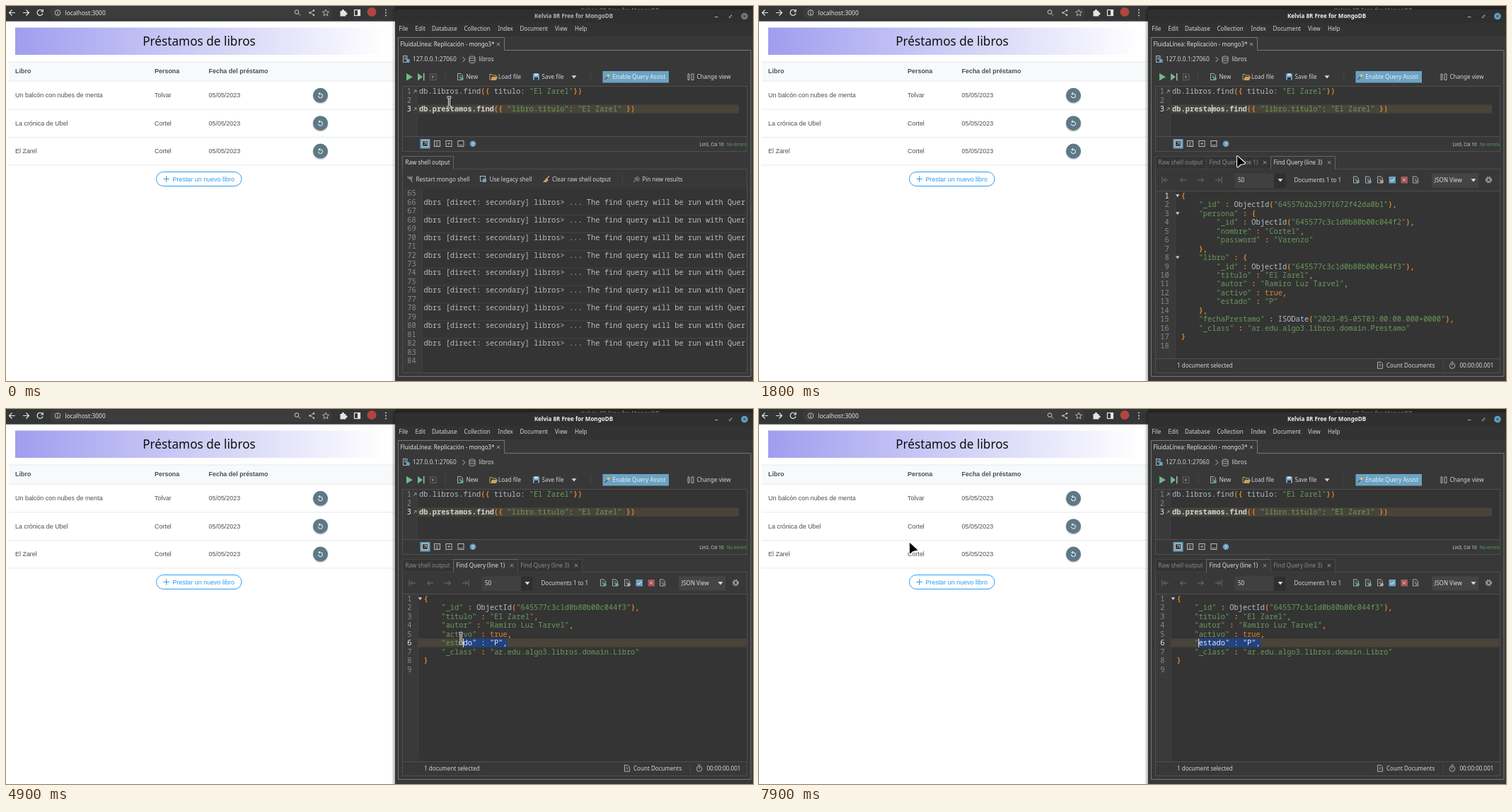
Recreate the animation shown at these times as an HTML page. Size 1056 by 530 pixels, loop 8 s.

```html
<!DOCTYPE html>
<html lang="es">
<head>
<meta charset="utf-8">
<title>Préstamos de libros</title>
<style>
  html, body { margin: 0; width: 100%; height: 100%; overflow: hidden; background: #fff; }
  svg { display: block; width: 1056px; height: 530px; }
  text { white-space: pre; }
  .ui { font: 8.05px "Noto Sans", "Open Sans", sans-serif; }
  .web { font: 8.95px "Liberation Sans", Arial, sans-serif; }
  .mono { font: 10.38px "Noto Sans Mono", "DejaVu Sans Mono", monospace; }
  .b { font-weight: bold; }
</style>
</head>
<body>
<svg id="stage" viewBox="0 0 1056 530"></svg>
<script>
const CW = 6.228, LH = 12.45, LOOP = 8000;
const C = { text: '#d4d4d4', dim: '#8a8a8a', code: '#b4bcc4', str: '#6a9a5b', punct: '#d9822f',
  panel: '#383838', edit: '#343434', gutter: '#3a3a3a', field: '#404040', line: '#555', active: '#48443a', blue: '#6ba2c2' };

const BOOK = 'El Zarel', READER = 'Cortel', APP = 'Kelvia 8R Free for MongoDB';

// Drawing helpers
const rect = (x, y, w, h, fill, more = '') =>
  `<rect x="${x}" y="${y}" width="${w}" height="${h}" fill="${fill}" ${more}/>`;
const path = (d, stroke, width = 1, fill = 'none', more = '') =>
  `<path d="${d}" stroke="${stroke}" stroke-width="${width}" fill="${fill}" ${more}/>`;
const solid = (d, fill, more = '') => path(d, 'none', 0, fill, more);
const circle = (x, y, r, fill, more = '') => `<circle cx="${x}" cy="${y}" r="${r}" fill="${fill}" ${more}/>`;
const text = (cls, x, y, s, fill, more = '') => `<text class="${cls}" x="${x}" y="${y}" fill="${fill}" ${more}>${s}</text>`;
const ui = (x, mid, s, fill = C.text, more = '') => text('ui', x, mid + 2.9, s, fill, more);
const mono = (x, mid, s, fill = C.code, more = '') => text('mono', x, mid + 3.6, s, fill, more);
const group = (id, body, more = '') => `<g id="${id}" ${more}>${body}</g>`;
const cross = (x, y, r = 2.2, color = '#aaa') =>
  path(`M${x - r} ${y - r}l${2 * r} ${2 * r}m0 ${-2 * r}l${-2 * r} ${2 * r}`, color, .9);
const down = (x, y, color = C.text) => solid(`M${x - 3.5} ${y - 2}h7l-3.5 4.2z`, color);
const page = (x, y, accent) => path(`M${x - 3.5} ${y - 4.5}h4.5l2.5 2.5v6.5h-7z`, '#bbb', .9) +
  path(`M${x - 1.5} ${y - 1}h3m-3 2h3`, '#bbb', .7) + (accent ? circle(x + 2.6, y + 2.8, 2.3, accent) : '');
const numberStyle = active => ({ fill: active ? '#eee' : C.dim, 'font-weight': active ? 'bold' : 'normal' });
const attrs = o => Object.entries(o).map(([k, v]) => `${k}="${v}"`).join(' ');
const lineNumber = (x, mid, n, active, id = '') =>
  mono(x, mid, n, C.dim, `id="${id}" text-anchor="end"`).replace(`fill="${C.dim}"`, attrs(numberStyle(active)));

const highlight = s => s.replace(/("[^"]*")|( :|[{}(),])|\b(true)\b/g, (m, str, punct) =>
  str ? `<tspan fill="${C.str}">${m}</tspan>`
    : `<tspan fill="${C.punct}"${punct ? ' font-weight="bold"' : ''}>${m}</tspan>`);

function browser() {
  const icon = '#d0d0d0';
  let s = rect(0, 0, 550, 530, '#fff') + rect(0, 0, 550, 21.5, '#343536') +
    rect(62, 1, 399, 17, '#3c3c3d', 'rx="8.5"') + rect(0, 20.5, 550, 1, '#444');
  s += path('M13 9.5H4.5m4-4l-4 4 4 4', '#e6e6e6', 1.2) + path('M24 9.5h8.5m-4-4l4 4-4 4', '#e6e6e6', 1.2) +
    path('M51.5 7A4 4 0 1 0 52 10.5M52.3 4.8V8h-3.2', '#e6e6e6', 1.2);
  s += circle(73, 9.5, 3.8, 'none', `stroke="${icon}" stroke-width=".9"`) + path('M73 8.8v3M73 6.8v1', icon);
  s += text('ui', 83.5, 12.5, 'localhost:3000', '#e4e4e4', 'style="font-size:8.45px"');
  s += circle(411, 8.5, 2.8, 'none', `stroke="${icon}"`) + path('M413 10.5l3 3', icon);
  s += path('M435 6.3l-5 3.2 5 3.2', icon, .8) +
    [[435, 6.3], [429.5, 9.5], [435, 12.7]].map(p => circle(...p, 1.2, icon)).join('');
  s += path('M452 5l1.3 3 3.2.3-2.4 2.1.7 3.2-2.8-1.7-2.8 1.7.7-3.2-2.4-2.1 3.2-.3z', icon, .8);
  s += solid('M472.5 7h2.3a1.7 1.7 0 1 1 3.2 0h2.3v2.2a1.7 1.7 0 1 1 0 3.2v2h-7.8z', '#e4e4e4');
  s += rect(492.5, 5.5, 8, 8, 'none', 'stroke="#e4e4e4" stroke-width="1.2"') + rect(497, 5, 4, 9, '#e4e4e4');
  s += circle(517, 8.5, 6.5, '#b0453f');
  s += [5.5, 9.5, 13.5].map(y => circle(537, y, 1, icon)).join('');

  s += rect(13, 30.5, 524, 38.5, 'url(#banner)');
  s += text('ui', 273, 56.3, 'Préstamos de libros', '#111', 'text-anchor="middle" style="font-size:17.2px"');
  s += rect(4, 79, 546, 27, '#f8f9fa');
  s += [79, 106, 146, 185.5, 225].map(y => rect(4, y - .5, 546, 1, '#e6e9ec')).join('');
  const row = (y, cells, cls) => cells.map((c, i) => text(cls, [13, 210, 286.5][i], y, c, '#495057')).join('');
  s += row(95.2, ['Libro', 'Persona', 'Fecha del préstamo'], 'web b');
  [['Un balcón con nubes de menta', 'Tolvar'], ['La crónica de Ubel', READER], [BOOK, READER]].forEach((r, i) => {
    const y = 126.3 + 39.4 * i;
    s += row(y + 3, [...r, '05/05/2023'], 'web') + circle(444.5, y + 1, 11, '#000', 'opacity=".18"') +
      circle(444.5, y, 10.5, '#5d7886') +
      path(`M442 ${y - 2.4}h2.5a3 3 0 1 1 -3 3M443.8 ${y - 4.2}l-1.8 1.8 1.8 1.8`, '#fff', 1);
  });
  s += rect(212.5, 234.5, 120.5, 20, '#fff', 'rx="10" stroke="#2f9bf0"') + path('M222.5 244.5h8.5m-4.25-4.25v8.5', '#2f9bf0', 1.1);
  return s + text('web', 235.5, 247.7, 'Prestar un nuevo libro', '#2f9bf0');
}

function appWindow() {
  let s = rect(550, 0, 506, 530, '#232323');
  s += `<g clip-path="url(#strip)">${text('ui b', 868, 8.5, APP, '#666', 'text-anchor="middle"')}</g>`;
  s += solid('M550 530V10q0-5 5-5h501v525z', C.panel) + solid('M550 24V10q0-5 5-5h501v19z', '#2f2f2f') + rect(550, 24, 506, 19, '#323232');
  s += text('ui b', 802.5, 17.4, APP, '#b4b4b4', 'id="title" text-anchor="middle"');
  s += path('M1002 15.5h4.5', '#aaa', 1.1) + path('M1022.5 16.5l3.5-3.5m-2 0h2v2m-3.5-.5v2h2', '#999', .9) +
    circle(1044, 14.5, 4.8, '#777', 'id="close"') + cross(1044, 14.5, 1.6, '#292929');
  [['File', 555.5], ['Edit', 578.5], ['Database', 602], ['Collection', 647.5], ['Index', 695.5], ['Document', 726.5],
    ['View', 776], ['Help', 804]].forEach(([n, x]) => s += ui(x, 32.2, n));
  s += path('M554.5 62.5V44.5H704.5V62.5H1053V523.5H554.5V62.5', '#777');
  s += ui(557.5, 53.8, 'FluidaLínea: Replicación - mongo3*', '#e2e2e2') + cross(696, 54);

  s += rect(561.5, 70.5, 5.5, 9, 'none', 'stroke="#9bb8c8"') + path('M563 73h3m-3 2h3', '#9bb8c8') + rect(566, 75, 4.5, 5, C.blue);
  s += ui(575, 75.4, '127.0.0.1:27060', C.text, 'style="font-size:8.4px"') + path('M645.5 72l3.5 3.5-3.5 3.5', '#bbb') +
    path('M655 72.5v6.5c0 2 8 2 8 0v-6.5c0-2-8-2-8 0c0 2 8 2 8 0M655 75.7c0 2 8 2 8 0', '#bbb', .9) + ui(668.5, 75.4, 'libros');

  s += group('run', solid('M566 95l9 5.2-9 5.2z', '#6fb98a') +
    solid('M582 95l7 5.2-7 5.2z', '#6fb98a') + rect(590, 95, 1.4, 10.4, '#bbb'));
  s += rect(599.5, 96, 8.5, 8.5, 'none', 'stroke="#777" stroke-dasharray="2 1"') + solid('M602 97.8l4 2.5-4 2.5z', '#777');
  s += [620.5, 826.5].map(x => rect(x, 93, .8, 14, '#4a4a4a')).join('');
  s += page(642, 100, '#62a77d') + ui(650.5, 100.2, 'New');
  s += path('M684 104.5v-8h3l1 1.5h5v2', '#c9a25e') + solid('M685 105l2-5h8l-2 5z', '#c9a25e') + ui(696, 100.2, 'Load file');
  s += rect(745, 95.5, 9, 9, C.blue) + rect(747, 95.5, 5, 3, '#ddd') + rect(747, 101, 5, 3.5, '#333') +
    ui(757.5, 100.2, 'Save file') + down(803, 100.2);
  s += rect(843.5, 92, 93.5, 16.5, C.blue) +
    path('M846.5 104l4-4', '#555', 1.5) + circle(851.5, 98.5, 2, '#e0c070') + ui(857.5, 100.2, 'Enable Query Assist', '#e8f1f6');
  s += path('M964 96v8.5h2V96zM969 96v8.5h3V96z', '#bbb', .9) + ui(976.5, 100.2, 'Change view');

  s += rect(560.5, 113.5, 487, 92, C.edit, `stroke="${C.line}" stroke-width=".8"`) + rect(561, 114, 20.5, 70.5, C.gutter) +
    rect(582, 139.5, 454, 12.3, C.active) + rect(561, 184.5, 486, 20.5, C.panel) + rect(561, 184, 486, .8, C.line) + rect(581.5, 114, .6, 70, '#484848');
  [`db.libros.find({ titulo: "${BOOK}"})`, '', `db.prestamos.find({ "libro.titulo": "${BOOK}" })`].forEach((l, i) => {
    const y = 120.8 + LH * i;
    s += lineNumber(573, y, i + 1, i == 2);
    if (l) s += path(`M576 ${y + 2.2}l4-4m-2.7 0h2.7v2.7`, '#aaa', .9) +
      mono(584, y, highlight(l).replace('db.prestamos.find', '<tspan font-weight="bold" fill="#ccd2d8">$&</tspan>'));
  });
  s += rect(640, 139.5, 1, 12, '#ddd', 'id="caret"');
  s += rect(585.5, 188, 14, 13.5, C.blue);
  s += [592.5, 609.5, 626, 643].map((x, i) => rect(x - 4, 190.5, 8, 8, '#333', 'stroke="#ccc" stroke-width=".9"') +
    path([`M${x - 2} 196.5l4-4m-4 0h4v4`, `M${x - 2} 193h4m-4 2h3m-3 2h4`, `M${x - 2} 194.5h4m-2-2v4`, `M${x - 2.5} 196.5h5`][i], '#bbb', .8)).join('');
  s += circle(660, 194.8, 4.3, C.blue) + ui(660, 194.8, '?', '#fff', 'text-anchor="middle" style="font-size:7px"');
  s += ui(980.5, 194.7, 'Lin3, Col 10', C.text, 'style="font-size:6.3px"') + ui(1019, 194.7, 'No errors', '#58a65c', 'style="font-size:6.2px"');
  return s;
}

const frame = () => path('M560.5 230.5H1047.5V518.5H560.5Z', C.line, .8);
function tab(x, w, label, active, closable = true) {
  const edge = active ? '#707070' : '#4c4c4c';
  return path(`M${x} 230.5V212.5h${w}v18`, edge, .8, active ? C.panel : '#343434') +
    (active ? rect(x + .5, 230, w - 1, 1, C.panel) : '') +
    ui(x + 4, 221.2, label, active ? '#e0e0e0' : '#8c8c8c') + (closable ? cross(x + w - 8.5, 221.2) : '');
}

function rawPanel() {
  let s = frame() + tab(560.5, 72, 'Raw shell output', true, false);
  s += path('M567 242h8m-6 2h5l-2 2 3 2.5', '#bbb') + ui(579.5, 244.6, 'Restart mongo shell');
  s += rect(670.5, 240.5, 7, 7, 'none', 'stroke="#bbb"') + rect(674, 244, 5, 5, C.blue) + ui(683.5, 244.6, 'Use legacy shell');
  s += path('M768 240l-4 5', '#ccc', 1.2) + solid('M764 243l3 3-3 3h-5z', '#c9a25e') + ui(772, 244.6, 'Clear raw shell output');
  s += rect(871, 238, .8, 13, '#4a4a4a') + path('M887 249l3.5-3.5m-2-2.5l5 5m-3.5-6l5 5m-3-6l4 4', '#bbb', .9) + ui(899.5, 244.6, 'Pin new results');
  s += rect(561, 258, 486, 260, C.edit) + rect(561, 258, 27, 260, C.gutter) + rect(588, 258, .6, 260, '#484848');
  for (let i = 0; i < 20; i++) {
    const y = 264.8 + LH * i;
    s += lineNumber(579.7, y, 65 + i, false);
    if (i % 2 && i < 18) s += mono(590.5, y, 'dbrs [direct: secondary] libros> ... The find query will be run with Quer') +
      (i > 1 ? rect(590, y - 7, 456, .8, '#484848') : '');
  }
  return s;
}

const bookDoc = `{
    "_id" : ObjectId("645577c3c1d0b80b00c044f3"),
    "titulo" : "${BOOK}",
    "autor" : "Ramiro Luz Tarvel",
    "activo" : true,
    "estado" : "P",
    "_class" : "ar.edu.algo3.libros.domain.Libro"
}
`;
const loanDoc = `{
    "_id" : ObjectId("64557b2b23971672f42da0b1"),
    "persona" : {
        "_id" : ObjectId("645577c3c1d0b80b00c044f2"),
        "nombre" : "${READER}",
        "password" : "Varenzo"
    },
    "libro" : {
        "_id" : ObjectId("645577c3c1d0b80b00c044f3"),
        "titulo" : "${BOOK}",
        "autor" : "Ramiro Luz Tarvel",
        "activo" : true,
        "estado" : "P"
    },
    "fechaPrestamo" : ISODate("2023-05-05T03:00:00.000+0000"),
    "_class" : "ar.edu.algo3.libros.domain.Prestamo"
}
`;

function resultPanel(id, tabs, doc, loading) {
  const tone = loading ? '#b0b0b0' : '#dedede';
  let s = frame() + tabs;
  s += path('M570 241.5v9m9-4.5h-7m3-3l-3 3 3 3M604 246h-8.5m3.5-3l-3.5 3 3.5 3M620 246h8.5m-3.5-3l3.5 3-3.5 3M645 246h7m-3-3l3 3-3 3m5-7.5v9', '#777', .9);
  s += rect(672.5, 236.5, 72, 20.5, C.field) + rect(728, 236.5, 16.5, 20.5, '#2f2f2f') +
    ui(677, 246.4, '50', tone) + down(737, 246.2, tone) + ui(756.5, 246.2, 'Documents 1 to 1');
  s += page(844, 245.5, '#62a77d') + page(861, 245.5, C.blue) + page(878, 245.5, '#aaa') +
    rect(890.5, 241, 9.5, 9.5, C.blue) + path('M892.5 246l2 2 3.5-4', '#fff') +
    rect(907.5, 241, 9.5, 9.5, '#a85555') + cross(912, 245.7, 2, '#ddd') + page(928, 245.5, '#777');
  s += rect(951, 236.5, 66, 20, '#444') + ui(955, 246.2, 'JSON View', tone) + down(1010, 246.2, tone);
  s += circle(1031.5, 245.7, 3.7, 'none', 'stroke="#bbb" stroke-width="1.8" stroke-dasharray="1.7 1.2"') + circle(1031.5, 245.7, 2.2, 'none', 'stroke="#bbb"');

  const lines = doc.split('\n'), wide = lines.length > 9 ? CW : 0, x = 590.5 + wide;
  s += rect(561, 261.5, 486, 236.5, C.edit) + rect(561, 261.5, 21 + wide, 236.5, C.gutter) + rect(582 + wide, 261.5, .6, 236.5, '#484848') +
    rect(561, 261, 486, .8, C.line) + rect(561, 498, 486, .8, C.line);
  s += rect(582.5, 324.4, 464, 12.3, C.active, `id="${id}Line" visibility="hidden"`);
  lines.forEach((l, i) => {
    const y = 268.3 + LH * i;
    s += lineNumber(573.5 + wide, y, i + 1, !i, `${id}N${i + 1}`) + mono(x, y, highlight(l));
    if (l.endsWith('{')) s += solid(`M${x - 7.7} ${y - 2}h5.4l-2.7 4z`, '#ccc');
  });
  s += ui(591, 507.8, '1 document selected') + page(878, 507.8) + ui(887, 507.8, 'Count Documents') + rect(967, 501, .8, 14, '#4a4a4a') +
    circle(980, 508.5, 3.8, 'none', 'stroke="#bbb" stroke-width=".9"') + path('M978.5 503h3m-1.5 3v2.5', '#bbb') + ui(990.5, 507.8, '00:00:00.001');
  return s;
}

const rawTab = tab(560.5, 72, 'Raw shell output', false, false);
const findTabs = active => rawTab + tab(632.5, 91, 'Find Query (line 1)', active == 1) + tab(723.5, 91, 'Find Query (line 3)', active == 3);

const outlined = (d, fill, width) =>
  path(d, '#fff', width + 2, fill, 'stroke-linejoin="round"') + path(d, '#000', width, fill, 'stroke-linejoin="round"');
const arrow = outlined('M.3 .8L.6 15 4.6 11.6 10.6 10.2Z', '#000', 1);
const beam = outlined('M-3 -7h6M0 -7v14M-3 7h6', 'none', 1);

const stage = document.getElementById('stage');
stage.innerHTML = `<defs>
  <linearGradient id="banner"><stop stop-color="#a09eee"/><stop offset="1" stop-color="#fff"/></linearGradient>
  <linearGradient id="fade"><stop stop-color="#000" stop-opacity="0"/><stop offset="1" stop-color="#000" stop-opacity=".3"/></linearGradient>
  <clipPath id="strip"><rect x="550" width="506" height="5"/></clipPath></defs>` +
  browser() + rect(545, 4, 5, 526, 'url(#fade)', 'id="shadow"') + appWindow() +
  group('panel0', rawPanel()) +
  group('panel1', resultPanel('a', tab(560.5, 109.5, 'Raw shell output - Running', false, false) + tab(670, 91, 'Find Query (line 1)', true), bookDoc, true)) +
  group('panel2', resultPanel('b', findTabs(3), loanDoc)) +
  group('panel3', resultPanel('c', findTabs(1), bookDoc)) +
  group('selection', rect(0, 324.4, 0, 12.3, '#214283', 'id="selBox"') + mono(0, 330.5, '', '#e4e8ee', 'id="selText"') +
    rect(0, 324.4, 1, 12.3, '#eee', 'id="selCaret"')) +
  group('arrow', arrow) + group('beam', beam);

const el = {};
stage.querySelectorAll('[id]').forEach(e => el[e.id] = e);
const show = (e, on) => e.setAttribute('visibility', on ? 'visible' : 'hidden');
const set = (e, values) => Object.entries(values).forEach(([k, v]) => e.setAttribute(k, v));

// Pointer stops: time, x, y
const stops = [[0, 626.5, 136], [300, 612, 122], [500, 582, 104], [700, 570, 96], [1300, 570, 96], [1500, 590, 110],
  [1700, 645, 170], [1800, 676, 212], [2100, 676, 219], [2800, 675, 219], [2900, 692, 286], [3100, 692, 286], [3300, 735, 278],
  [3500, 762, 288], [3600, 751.5, 291.5], [3700, 720, 318], [3800, 685, 350], [3900, 676, 364], [4000, 698, 354],
  [4200, 713, 333], [4500, 711, 330], [4900, 643, 324], [5300, 620, 325], [5600, 620, 325], [5700, 620, 328], [5900, 620, 328],
  [6000, 420, 250], [6100, 288, 191], [6300, 288, 191], [6400, 190, 196], [6500, 90, 201], [6600, 41, 199], [6700, 62, 193],
  [6900, 152, 180], [7100, 136, 187], [7300, 123, 193], [7500, 150, 195], [7900, 213, 189], [8000, 213, 189]];

function pointerAt(t) {
  const i = stops.findIndex(s => s[0] > t), [t0, x0, y0] = stops[i - 1], [t1, x1, y1] = stops[i];
  const k = (t - t0) / (t1 - t0);
  return [x0 + (x1 - x0) * k, y0 + (y1 - y0) * k];
}

const picked = bookDoc.split('\n')[5];
function draw(ms) {
  const t = Math.floor(ms % LOOP / 100) * 100;
  const focused = t >= 900, clicked = t >= 4300;
  const panel = t < 1000 ? 0 : t < 1300 ? 1 : t < 2200 ? 2 : 3;
  for (let i = 0; i < 4; i++) el['panel' + i].setAttribute('display', i == panel ? 'inline' : 'none');
  set(el.title, { fill: focused ? '#f0f0f0' : '#b4b4b4' });
  set(el.close, { fill: focused ? '#5f9fc4' : '#777' });
  set(el.shadow, { opacity: focused ? 1 : .6 });
  set(el.run, { opacity: focused && t < 1300 ? .4 : 1 });
  show(el.caret, focused && t < 2200);

  const [x, y] = pointerAt(t), isBeam = t < 500 || (t >= 2900 && t < 6000);
  show(el.beam, isBeam);
  show(el.arrow, !isBeam);
  set(isBeam ? el.beam : el.arrow, { transform: `translate(${x} ${y})` });

  show(el.cLine, clicked && panel == 3);
  set(el.cN1, numberStyle(!clicked));
  set(el.cN6, numberStyle(clicked));
  el.selection.setAttribute('display', clicked ? 'inline' : 'none');
  const col = t >= 5300 ? 5 : Math.max(5, Math.min(picked.length, Math.ceil((x - 590.5) / CW)));
  const left = 590.5 + col * CW;
  set(el.selBox, { x: left, width: (picked.length - col) * CW });
  set(el.selText, { x: left });
  el.selText.textContent = picked.slice(col);
  set(el.selCaret, { x: left - .5 });
}

const start = performance.now();
function tick() {
  draw(performance.now() - start);
  requestAnimationFrame(tick);
}
draw(0);
requestAnimationFrame(tick);
</script>
</body>
</html>
```
